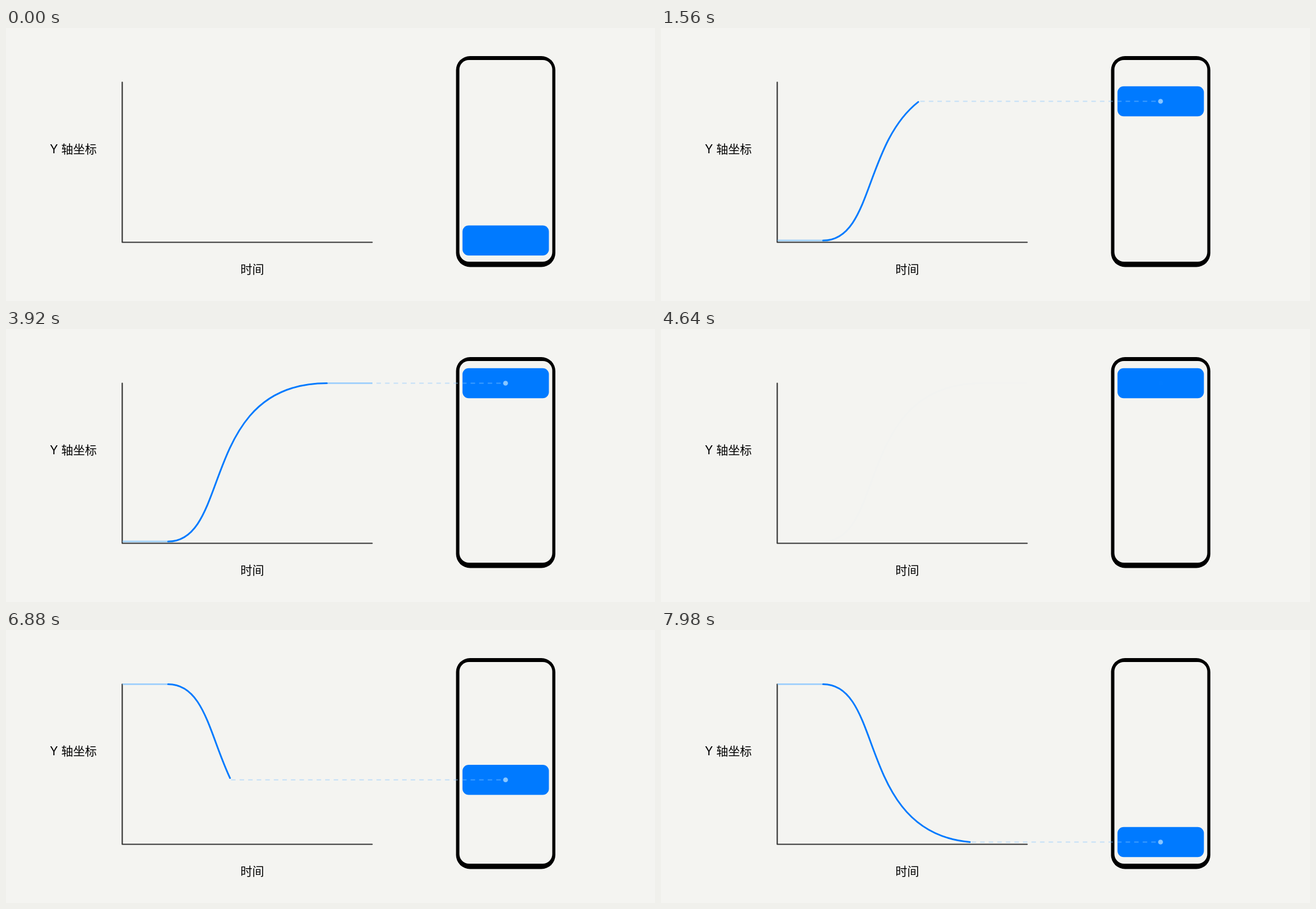
Animation of 1153 by 486 pixels, one loop 8 s. Source, as an HTML page:

```html
<!DOCTYPE html>
<html lang="zh-CN">
<head>
<meta charset="utf-8">
<style>
  html, body { margin: 0; width: 100%; height: 100%; overflow: hidden; background: #f4f4f1; }
  svg { display: block; }
  text { font: 21px Inter, "Noto Sans CJK SC", "Noto Sans CJK", sans-serif; }
  path { fill: none; stroke-linecap: round; stroke-linejoin: round; }
  .light { stroke: #88c6ff; stroke-linecap: butt; }
</style>
</head>
<body>
<svg width="1153" height="486" viewBox="0 0 1153 486">
  <text x="78" y="223">Y 轴坐标</text>
  <text x="416.5" y="437">时间</text>
  <path d="M206.5 96.5V381.5H650.5" stroke="#333" stroke-width="2.2"/>
  <rect x="799.5" y="50" width="176.5" height="375.5" rx="25"/>
  <rect x="805.5" y="57" width="165" height="359" rx="17" fill="#f4f4f1"/>
  <rect id="block" x="811" width="153.5" height="53.5" rx="11" fill="#007aff"/>
  <g id="plot">
    <path id="rest" class="light" stroke-width="3" opacity=".75"/>
    <path id="curve" stroke="#007aff" stroke-width="3"/>
    <path id="dash" class="light" stroke-width="2" stroke-dasharray="8 7.2" opacity=".45"/>
    <circle id="dot" cx="887.5" r="4.3" fill="#88c6ff"/>
  </g>
</svg>
<script>
const LOW = 378.3, HIGH = 96.5, LEFT = 207, START = 288, SPAN = 282, END = 651;
const MOVE = 43, REST = 12, FADE = 15;

// Times are in ticks; the second run goes back down.
const runs = [
  { from: LOW, to: HIGH, fadeIn: 0, fadeTicks: 4, lead: 8, start: 8, fadeOut: 87 },
  { from: HIGH, to: LOW, fadeIn: 104, fadeTicks: FADE, lead: REST, start: 131, fadeOut: 999 }
];

const el = id => document.getElementById(id);
const set = (id, name, value) => el(id).setAttribute(name, value);
const clamp = (v, lo = 0, hi = 1) => Math.min(hi, Math.max(lo, v));

// Easing cubic-bezier(.4, 0, .2, 1)
const bezX = s => 1.2 * s * (1 - s) ** 2 + 0.6 * s * s * (1 - s) + s ** 3;
const bezY = s => s * s * (3 - 2 * s);
function solve(x) {
  let lo = 0, hi = 1;
  for (let i = 0; i < 24; i++) {
    const mid = (lo + hi) / 2;
    if (bezX(mid) < x) lo = mid; else hi = mid;
  }
  return hi;
}
const ease = x => bezY(solve(clamp(x)));

// Each 140 ms holds three ticks of 20, 100 and 20 ms.
function tickAt(ms) {
  const phase = ms % 140;
  return 3 * Math.floor(ms / 140) + (phase >= 20) + (phase >= 120);
}

function curvePath(s, run) {
  const pt = (x, y) => `${START + SPAN * x} ${run.from + (run.to - run.from) * y}`;
  return `M${pt(0, 0)}C${pt(0.4 * s, 0)} ${pt(0.8 * s - 0.6 * s * s, s * s)} ${pt(bezX(s), bezY(s))}`;
}

function draw(n) {
  const run = runs[n < runs[1].fadeIn ? 0 : 1];
  const { from, to, start, lead } = run;
  const p = (n - start) / MOVE;
  const y = from + (to - from) * ease(p);
  const before = clamp((n - start) / lead + 1);
  const after = clamp((n - start - MOVE) / REST);
  const head = LEFT + (START - LEFT) * before + SPAN * clamp(p) + (END - START - SPAN) * after;

  // The drawn curve trails the dashed line a little.
  const u = p < 1 ? p - 1.5 / SPAN : 1;

  let rest = `M${LEFT} ${from}H${Math.min(head, START)}`;
  if (after > 0) rest += `M${START + SPAN} ${to}H${head}`;
  set('rest', 'd', rest);
  set('curve', 'd', u > 0 ? curvePath(solve(u), run) : '');
  set('dash', 'd', `M879 ${y}H${head}`);
  set('dot', 'cy', y);
  set('block', 'y', y - 26.75);
  set('plot', 'opacity',
    ease((n - run.fadeIn) / run.fadeTicks) * (1 - ease((n - run.fadeOut) / FADE)));
}

function frame() {
  draw(tickAt(performance.now() % 8000));
  requestAnimationFrame(frame);
}
frame();
</script>
</body>
</html>
```
